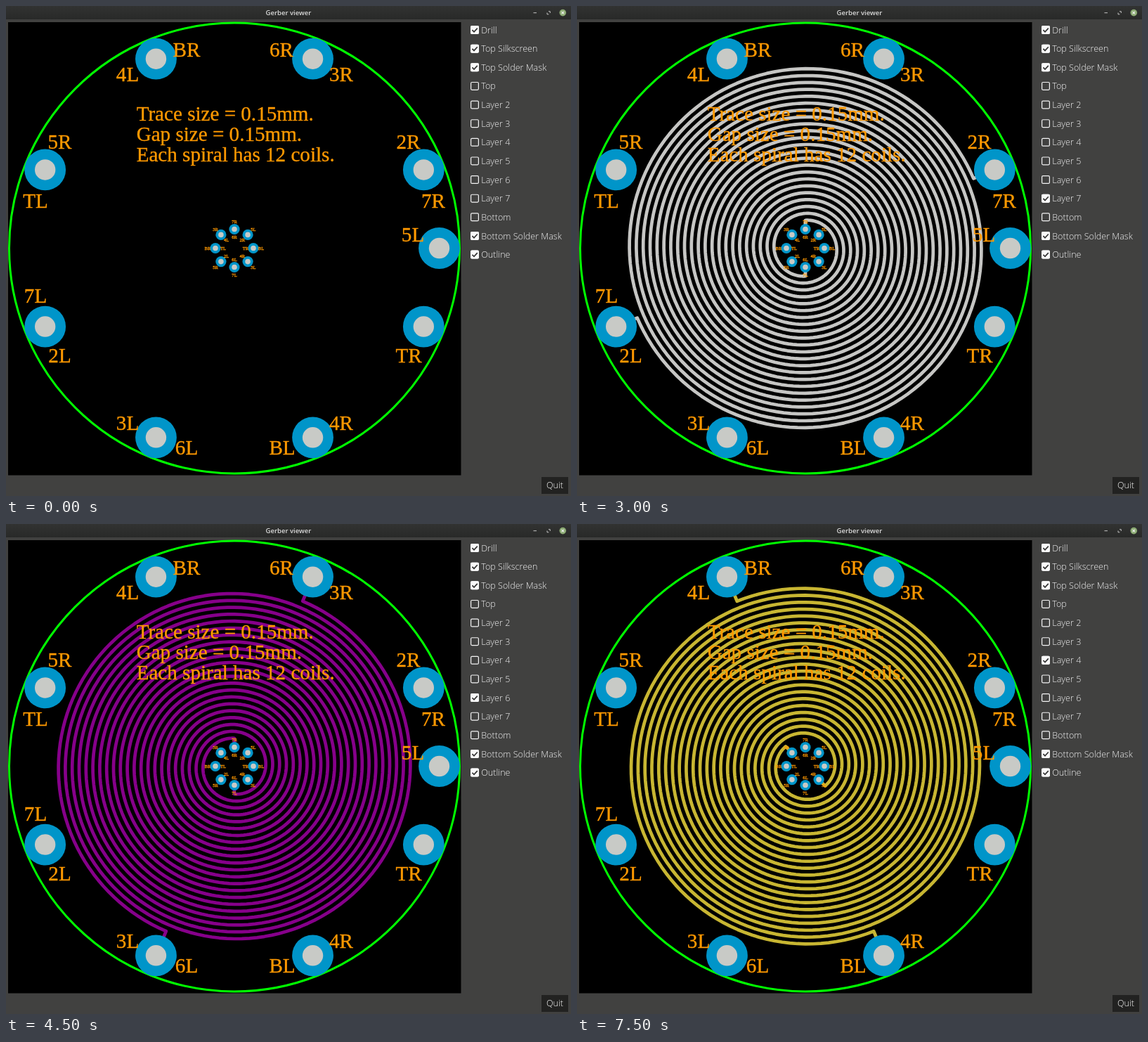
Write an HTML page that moves like this. It is 804 px wide and 697 px high and loops after 8000 ms.

```html
<!DOCTYPE html>
<html lang="en">
<head>
<meta charset="utf-8">
<title>Gerber viewer</title>
<style>
  html, body { margin: 0; width: 100%; height: 100%; overflow: hidden; background: #414140; }
  svg { display: block; }
  .ui { font: 300 12.6px "Open Sans", "Noto Sans", sans-serif; fill: #f2f2f2; }
  .title { font: 600 9.5px "Open Sans", "Noto Sans", sans-serif; fill: #dcdcdc; text-anchor: middle; }
  .silk { font-family: "Liberation Serif", "Times New Roman", serif; fill: #ff9900; stroke: #ff9900; }
  .big { font-size: 29.1px; stroke-width: .35px; }
  .small { font-size: 6.6px; stroke-width: .3px; }
  .mid { text-anchor: middle; }
  .trace { fill: none; stroke-width: 4.7; stroke-linejoin: round; stroke-linecap: round; }
</style>
</head>
<body>
<svg id="stage" width="804" height="697" viewBox="0 0 804 697">
  <defs>
    <linearGradient id="bar" x2="0" y2="1">
      <stop offset="0" stop-color="#323332"/>
      <stop offset="1" stop-color="#282928"/>
    </linearGradient>
  </defs>
  <rect width="804" height="697" fill="#414140"/>
  <rect width="804" height="19" fill="url(#bar)"/>
  <text class="title" x="402" y="13.3">Gerber viewer</text>
  <g fill="none" stroke="#c4c4c4">
    <path d="M750.5 9.7h4.5"/>
    <path d="M772 7.7h2.3v2.3M772.3 11.8h-2.3v-2.3"/>
  </g>
  <circle cx="792.3" cy="9.6" r="4.8" fill="#8cab74"/>
  <path d="M790.5 7.8l3.6 3.6m0-3.6l-3.6 3.6" stroke="#f4f4f4" stroke-width="1.2"/>
  <rect x="3" y="23" width="644.5" height="644.5"/>
  <g id="board"></g>
  <g id="panel"></g>
  <rect x="762" y="670" width="38" height="24" fill="#222221"/>
  <text class="ui mid" x="781" y="686.4">Quit</text>
</svg>
<script>
const NS = "http://www.w3.org/2000/svg";
const CX = 325, CY = 344.5;
const HOLD = 1500, LOOP = 8000;
const PITCH = 19.6, R_IN = 39.7, R_VIA = 27, R_PAD = 291.5;

const board = document.getElementById("board");
const panel = document.getElementById("panel");

function add(parent, tag, attrs, text) {
  const el = document.createElementNS(NS, tag);
  for (const key in attrs) el.setAttribute(key, attrs[key]);
  if (text) el.textContent = text;
  parent.appendChild(el);
  return el;
}

function polar(r, deg) {
  const a = deg * Math.PI / 180;
  return [CX + r * Math.cos(a), CY - r * Math.sin(a)];
}

// One arm: pad, spiral inwards, via. dir is 1 for counter-clockwise.
function arm(start, dir, skip) {
  const sweep = dir > 0 ? 11.1875 * 360 : 10.9375 * 360;
  const pts = [polar(R_PAD, start + dir * skip)];
  for (let a = skip; a <= sweep; a += 2.5) {
    pts.push(polar(R_IN + PITCH * (sweep - a) / 360, start + dir * a));
  }
  pts.push(polar(R_IN, start + dir * sweep), polar(R_VIA, start + dir * sweep));
  return "M" + pts.map(p => p[0].toFixed(2) + " " + p[1].toFixed(2)).join("L");
}

function pad(r, deg, size) {
  const [cx, cy] = polar(r, deg);
  add(board, "circle", { cx, cy, r: size, fill: "#0095c9" });
  add(board, "circle", { cx, cy, r: size / 2, fill: "#c8cac6" });
}

// Copper layers in the order they are shown
const layers = [
  { color: "#2c2cff", start: 112.5, dir: 1 },
  { color: "#c6c6c4", start: 22.5, dir: 1 },
  { color: "#86008a", start: 67.5, dir: -1 },
  { color: "#004a00", start: 157.5, dir: 1, skip: 22.5 },
  { color: "#c8b632", start: 112.5, dir: -1 }
];

add(board, "circle", { cx: CX, cy: CY, r: 320.5, fill: "none", stroke: "#00ff00", "stroke-width": 3 });
for (const l of layers) {
  const d = arm(l.start, l.dir, 0) + arm(l.start + 180, l.dir, l.skip || 0);
  l.node = add(board, "path", { class: "trace", stroke: l.color, d });
}

for (let k = 0; k < 8; k++) {
  pad(R_PAD, 22.5 + 45 * k, 29.4);
  pad(R_VIA, 45 * k, 7.6);
}
pad(R_PAD, 0, 29.4);

const notes = ["Trace size = 0.15mm.", "Gap size = 0.15mm.", "Each spiral has 12 coils."];
notes.forEach((s, i) => add(board, "text", { class: "silk big", x: 185.7, y: 162.6 + 29.3 * i }, s));

const labels = [
  ["BR", 257, 62], ["4L", 173, 97], ["6R", 392, 62], ["3R", 477, 97],
  ["5R", 76.5, 193], ["TL", 42, 277], ["2R", 572.5, 193], ["7R", 608, 277],
  ["7L", 42, 412.5], ["2L", 76.5, 497], ["5L", 579, 325], ["TR", 573, 497],
  ["3L", 173, 593], ["6L", 257, 628], ["4R", 477, 593], ["BL", 393, 628]
];
for (const [s, x, y] of labels) {
  add(board, "text", { class: "silk big mid", x, y: y + 9.7 }, s);
}

// Via labels, counter-clockwise from the right: outside and inside the ring
const outside = ["BL", "5L", "7R", "3R", "BR", "5R", "7L", "3L"];
const inside = ["TR", "2R", "6R", "4L", "TL", "2L", "6L", "4R"];
function viaLabel(s, r, deg) {
  const [x, y] = polar(r, deg);
  add(board, "text", { class: "silk small mid", x, y: y + 2.3 }, s);
}
for (let k = 0; k < 8; k++) {
  viaLabel(outside[k], 38, 45 * k);
  viaLabel(inside[k], 16, 45 * k);
}

const rows = ["Drill", "Top Silkscreen", "Top Solder Mask", "Top", "Layer 2", "Layer 3", "Layer 4",
  "Layer 5", "Layer 6", "Layer 7", "Bottom", "Bottom Solder Mask", "Outline"];
const alwaysOn = i => i < 3 || i > 10;
const ticks = rows.map((name, i) => {
  const y = 34 + 26.63 * i;
  add(panel, "rect", { x: 661.6, y: y - 5.4, width: 10.8, height: 10.8, rx: 1.5,
    fill: "none", stroke: "#f4f4f4", "stroke-width": 1.2 });
  const tick = add(panel, "g", {});
  add(tick, "rect", { x: 661, y: y - 6, width: 12, height: 12, rx: 2, fill: "#fafafa" });
  add(tick, "path", { d: `M663.4 ${y + .2}l2.6 2.6l4.8 -5.2`, fill: "none",
    stroke: "#333", "stroke-width": 1.7 });
  add(panel, "text", { class: "ui", x: 676.2, y: y + 4.6 }, name);
  return tick;
});

function show(el, on) {
  el.setAttribute("visibility", on ? "visible" : "hidden");
}

function draw(t) {
  const step = Math.floor(t % LOOP / HOLD);
  layers.forEach((l, i) => show(l.node, i + 1 === step));
  ticks.forEach((el, i) => show(el, alwaysOn(i) || (step > 0 && i === 11 - step)));
}

const t0 = performance.now();
function loop() {
  draw(performance.now() - t0);
  requestAnimationFrame(loop);
}
loop();
</script>
</body>
</html>
```
